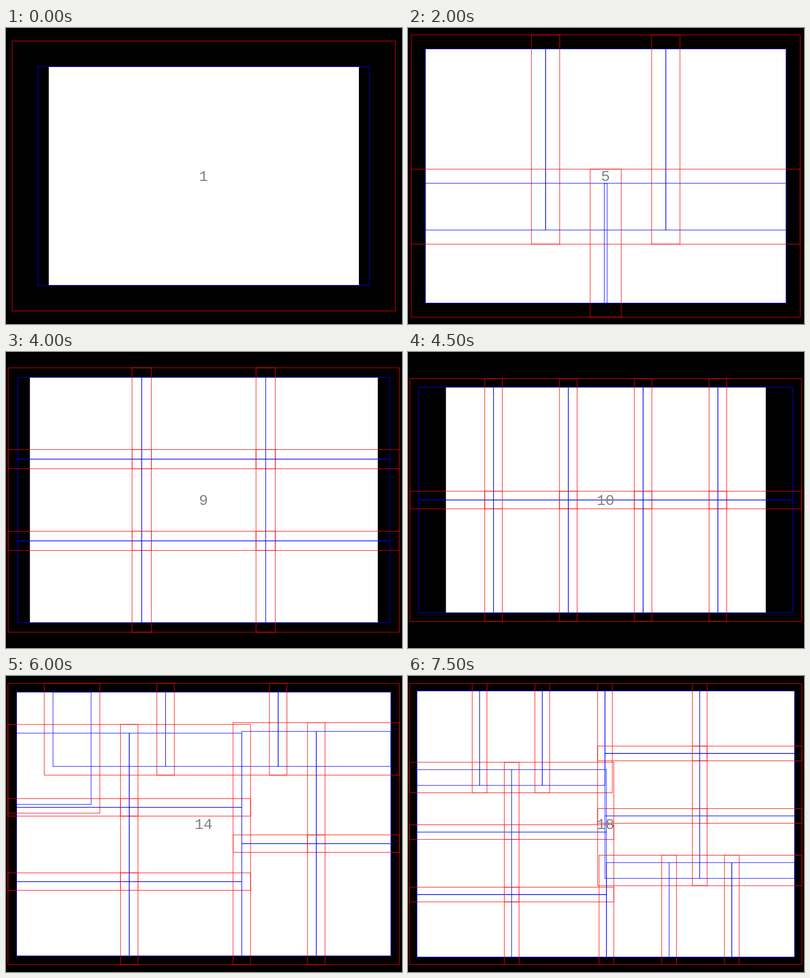
An HTML page with a canvas that plays this animation: 800x600 px, repeating every 8000 ms.

```html
<!DOCTYPE html>
<html lang="en">
<head>
<meta charset="utf-8">
<title>Page tiling</title>
<style>
html, body { margin: 0; width: 100%; height: 100%; overflow: hidden; background: #000; }
canvas { display: block; width: 800px; height: 600px; }
</style>
</head>
<body>
<canvas id="stage" width="800" height="600"></canvas>
<script>
const STEP = 500;
const LONG = 257, SHORT = 170;   // printable area of a sheet, mm
const MARGIN = 20, GAP = 5;
const RATIO = Math.SQRT2;

// Sheet count, covered width, then the blocks at the corners: top left,
// top right, bottom left, bottom right. P = portrait, L = landscape.
// Without a width a single grid defines the area.
const layouts = [
  [1, 0, "L1x1"],
  [2, 0, "P2x1"],
  [3, 0, "P3x1"],
  [4, 0, "L2x2"],
  [5, 510, "P3x1 - L1x1 L1x1"],
  [6, 597, "P2x1 L1x1 L1x1 P2x1"],
  [7, 427 * RATIO, "P1x1 P3x1 L1x1 L2x1"],
  [8, 684, "P1x1 L2x1 P1x1 L2x2"],
  [9, 0, "L3x3"],
  [10, 0, "P5x2"],
  [11, 771, "P1x1 P4x1 L3x2 -"],
  [12, 597 * RATIO, "P2x1 L2x2 L2x2 P2x1"],
  [14, 854, "P1x1 L3x1 L2x3 P2x2"],
  [15, 941, "P1x1 L3x1 P1x2 L3x3"],
  [16, 684 * RATIO, "P1x2 P5x2 L1x1 L3x1"],
  [18, 1024, "P3x1 L2x3 L2x3 P3x1"]
].map(([count, width, spec]) => build(count, width, spec));

function parse(text) {
  if (text === "-") return null;
  const [cols, rows] = text.slice(1).split("x").map(Number);
  const [w, h] = text[0] === "P" ? [SHORT, LONG] : [LONG, SHORT];
  return { cols, rows, w, h };
}

function build(count, width, spec) {
  const blocks = spec.split(" ").map(parse);
  const first = blocks[0];
  const w = width || first.cols * first.w;
  const h = width ? width / RATIO : first.rows * first.h;
  const sheets = [];
  blocks.forEach((b, corner) => {
    if (!b) return;
    const left = corner % 2 ? w - b.cols * b.w : 0;
    const top = corner > 1 ? h - b.rows * b.h : 0;
    for (let r = 0; r < b.rows; r++)
      for (let c = 0; c < b.cols; c++)
        sheets.push({ x: left + c * b.w, y: top + r * b.h, w: b.w, h: b.h });
  });
  return { count, w, h, sheets };
}

const ctx = document.getElementById("stage").getContext("2d");

function draw({ count, w, h, sheets }) {
  const pad = 2 * (MARGIN + GAP);
  const scale = Math.min(800 / (w + pad), 600 / (h + pad));
  const x0 = 400 - w * scale / 2, y0 = 300 - h * scale / 2;

  ctx.fillStyle = "#000";
  ctx.fillRect(0, 0, 800, 600);

  const pw = Math.min(w, h * RATIO) * scale, ph = pw / RATIO;
  ctx.fillStyle = "#fff";
  ctx.fillRect(399.7 - pw / 2, 300 - ph / 2, pw, ph);

  const outline = (s, grow, color) => {
    ctx.strokeStyle = color;
    ctx.strokeRect(x0 - 0.6 + (s.x - grow) * scale, y0 + (s.y - grow) * scale,
      (s.w + 2 * grow) * scale, (s.h + 2 * grow) * scale);
  };
  ctx.lineWidth = 1;
  for (const s of sheets) {
    outline(s, 0, "#00f");
    outline(s, MARGIN, "#f00");
  }

  ctx.fillStyle = "#808080";
  ctx.font = '30px "Liberation Mono", monospace';
  ctx.textAlign = "center";
  ctx.fillText(count, 399, 310);
}

const start = performance.now();
let shown = -1;
function tick() {
  const i = Math.floor((performance.now() - start) / STEP) % layouts.length;
  if (i !== shown) draw(layouts[shown = i]);
  requestAnimationFrame(tick);
}
tick();
</script>
</body>
</html>
```
